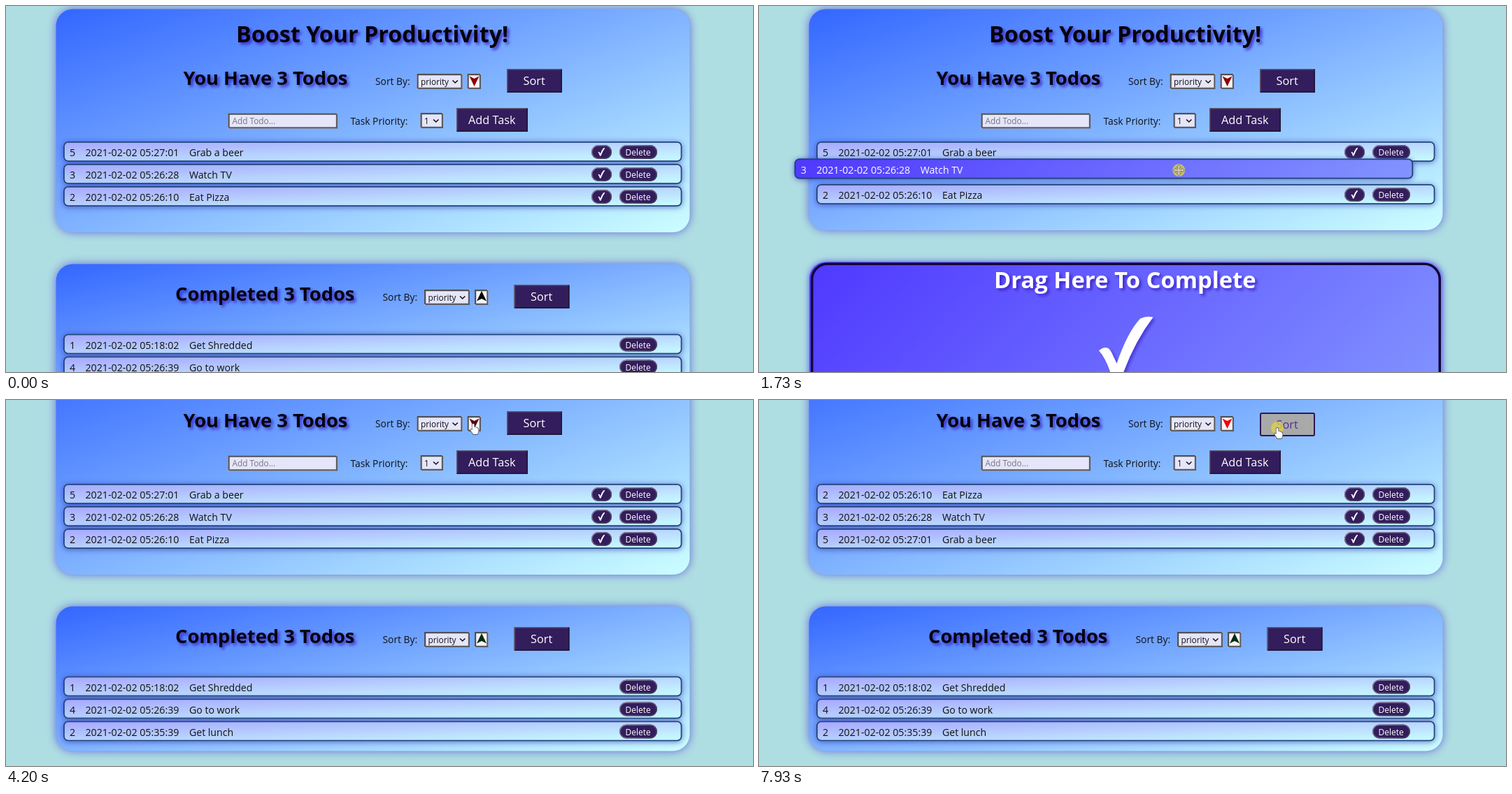
Write an HTML page with a canvas that moves like this. It is 1068 px wide and 524 px high and loops after 7.99 s.

```html
<!DOCTYPE html>
<html lang="en">
<head>
<meta charset="utf-8">
<title>Todo list</title>
<style>
html, body { margin: 0; height: 100%; overflow: hidden; background: #aedde2; }
canvas { display: block; }
</style>
</head>
<body>
<canvas id="stage" width="1068" height="524"></canvas>
<script>
const ctx = document.getElementById('stage').getContext('2d');
const LOOP = 7990;
const PURPLE = '#331d5c';
const ROW_TOP = 194, ROW_PITCH = 32;
const GRAB = { x: 631, y: 242 };
const DRAG = [820, 1880];

const beer = ['5', '2021-02-02 05:27:01', 'Grab a beer'];
const tv = ['3', '2021-02-02 05:26:28', 'Watch TV'];
const pizza = ['2', '2021-02-02 05:26:10', 'Eat Pizza'];
const completed = [
  ['1', '2021-02-02 05:18:02', 'Get Shredded'],
  ['4', '2021-02-02 05:26:39', 'Go to work'],
  ['2', '2021-02-02 05:35:39', 'Get lunch']
];

// time, x, y of the pointer
const pointerPath = [
  [180, 690, 545], [560, 640, 250], [800, 631, 242], [940, 633, 226],
  [1230, 659, 200], [1380, 706, 92], [1500, 640, 48], [1620, 549, 150],
  [1730, 600, 235], [1880, 631, 242], [2000, 640, 240], [2400, 741, 271],
  [2910, 741, 271], [3200, 600, 265], [3330, 545, 190], [3390, 568, 160],
  [3640, 610, 142], [3710, 610, 142], [4080, 668, 34], [4760, 668, 34],
  [5250, 745, 40], [6180, 745, 40], [6480, 693, 59], [6850, 668, 35],
  [7050, 668, 35], [7500, 741, 40]
];
// start, end, task under the pointer
const hovers = [
  [520, 820, tv], [1880, 2200, tv], [2200, 2700, pizza],
  [3380, 3440, pizza], [3440, 3600, tv], [3600, 3800, beer]
];
const presses = [[800, 1880], [4570, 4700], [5380, 5500], [6900, 7000], [7850, LOOP]];

const within = (t, [start, end]) => t >= start && t < end;

function pointerAt(t) {
  const next = pointerPath.findIndex(key => key[0] > t);
  if (next === 0) return { x: 690, y: 560 };
  if (next < 0) { const [, x, y] = pointerPath.at(-1); return { x, y }; }
  const [t0, x0, y0] = pointerPath[next - 1], [t1, x1, y1] = pointerPath[next];
  const p = (t - t0) / (t1 - t0);
  return { x: x0 + (x1 - x0) * p, y: y0 + (y1 - y0) * p };
}

function gradient(x, y, w, h, dx, dy, from, to) {
  const cx = x + w / 2, cy = y + h / 2;
  const g = ctx.createLinearGradient(cx - dx, cy - dy, cx + dx, cy + dy);
  g.addColorStop(0, from);
  g.addColorStop(1, to);
  return g;
}

function cornerGradient(x, y, w, h, from, to) {
  const k = w * h / (w * w + h * h);
  return gradient(x, y, w, h, h * k, w * k, from, to);
}

function activeGradient(x, y, w, h) {
  const reach = (w + h) / 4;
  return gradient(x, y, w, h, reach, reach, '#4f38ff', '#8395ff');
}

function glow(color, blur, dx = 0, dy = 0) {
  ctx.shadowColor = color;
  ctx.shadowBlur = blur;
  ctx.shadowOffsetX = dx;
  ctx.shadowOffsetY = dy;
}
const noGlow = () => glow('transparent', 0);

function box(x, y, w, h, radius, fill) {
  ctx.beginPath();
  ctx.roundRect(x, y, w, h, radius);
  ctx.fillStyle = fill;
  ctx.fill();
}

function outline(x, y, w, h, radius, width, color) {
  ctx.beginPath();
  ctx.roundRect(x + width / 2, y + width / 2, w - width, h - width, radius);
  ctx.lineWidth = width;
  ctx.strokeStyle = color;
  ctx.stroke();
}

function text(str, x, y, size, color = '#101018', weight = 400) {
  ctx.font = `${weight} ${size}px "Open Sans", "Noto Sans", sans-serif`;
  ctx.fillStyle = color;
  ctx.fillText(str, x, y);
}

function heading(str, x, y, size, color = '#03030c') {
  glow('rgba(50,25,190,.85)', 4, 3, 3);
  text(str, x, y, size, color, 700);
  noGlow();
}

function panel(y, h) {
  glow('rgba(75,65,215,.75)', 13);
  box(71.5, y, 906, h, 24, cornerGradient(72, y, 905.5, h, '#3366ff', '#ccffff'));
  noGlow();
}

function checkMark(x, y, scale) {
  ctx.save();
  ctx.translate(x, y);
  ctx.scale(scale, scale);
  ctx.fillStyle = '#fff';
  ctx.fill(new Path2D('M0 48Q12 38 18 51L25 66Q40 22 58 3Q66 -1 76 1Q48 38 31 88Q25 92 19 88Q11 60 0 48Z'));
  ctx.restore();
}

function pill(x, y, w) {
  box(x, y, w, 20, 10, PURPLE);
  outline(x, y, w, 20, 9, 1.5, cornerGradient(x, y, w, 20, '#8f88a6', '#3a3050'));
}

function row([priority, date, title], x, y, { light = 0, active = false, buttons = '' } = {}) {
  glow('rgba(50,40,170,.65)', 9, 0, 1);
  box(x, y, 884.5, 29, 7, active ? activeGradient(x, y, 884, 29) : cornerGradient(x, y, 884, 29, '#a6a6ff', '#c9ffff'));
  noGlow();
  outline(x, y, 884.5, 29, 6, 1.8, '#1b467c');
  const level = Math.round(16 + 239 * light), color = `rgb(${level},${level},${level})`;
  text(priority, x + 9, y + 21, 14.2, color);
  text(date, x + 31.5, y + 21, 14.2, color);
  text(title, x + 180, y + 21, 14.1, color);
  if (buttons.includes('check')) {
    pill(x + 755, y + 5, 29);
    checkMark(x + 764.5, y + 9, .13);
  }
  if (buttons.includes('delete')) {
    pill(x + 795, y + 5, 54);
    text('Delete', x + 803.5, y + 20, 12, '#fff');
  }
}

function bevel(x, y, w, h, light, dark, width) {
  ctx.lineWidth = width;
  const i = width / 2;
  for (const [color, cx, cy] of [[light, x + i, y + i], [dark, x + w - i, y + h - i]]) {
    ctx.strokeStyle = color;
    ctx.beginPath();
    ctx.moveTo(x + i, y + h - i);
    ctx.lineTo(cx, cy);
    ctx.lineTo(x + w - i, y + i);
    ctx.stroke();
  }
}

function button(label, x, y, w, labelX, { hover, pressed, focus } = {}) {
  if (pressed) y += 2;
  box(x, y, w, 34, 1, hover ? '#a9a9a9' : PURPLE);
  if (focus) {
    outline(x, y, w, 34, 2, 2, hover ? '#2e1758' : '#10091f');
    if (!hover) outline(x - 1, y - 1, w + 2, 36, 3, 1, 'rgba(255,255,255,.55)');
  } else bevel(x, y, w, 34, '#5d556a', '#1d1430', 1.5);
  text(label, labelX, y + 23, 16.3, hover ? '#51308f' : '#fff');
}

function field(x, y, w, fill = '#e6e6fa') {
  box(x, y, w, 22, 1, fill);
  bevel(x, y, w, 22, '#505055', '#5c5c62', 2.2);
}

function select(label, x, y, w) {
  field(x, y, w);
  text(label, x + 5.5, y + 16, 11.8);
  ctx.strokeStyle = '#111';
  ctx.lineWidth = 1.6;
  ctx.beginPath();
  ctx.moveTo(x + w - 14, y + 9.5);
  ctx.lineTo(x + w - 10.3, y + 13);
  ctx.lineTo(x + w - 6.6, y + 9.5);
  ctx.stroke();
}

function sortControls(x, y, arrowUp, arrowColor, sortState) {
  text('Sort By:', x, y + 16, 13.8);
  select('priority', x + 59.5, y, 65);
  field(x + 131.5, y, 19.5, '#f6f4fa');
  const cx = x + 141.5, cy = y + 10, dir = arrowUp ? 1 : -1;
  ctx.fillStyle = arrowColor;
  ctx.beginPath();
  ctx.moveTo(cx, cy - 8 * dir);
  ctx.lineTo(cx + 7, cy + 6.5 * dir);
  ctx.lineTo(cx, cy + 3 * dir);
  ctx.lineTo(cx - 7, cy + 6.5 * dir);
  ctx.fill();
  button('Sort', x + 188, y - 7, 79, x + 211.5, sortState);
}

function dropZone(y) {
  glow('rgba(60,50,230,.8)', 10);
  box(72, y, 905, 207, 24, activeGradient(72, y, 905, 207));
  noGlow();
  outline(74, y + 1, 901, 203, 22, 3.5, '#140534');
  heading('Drag Here To Complete', 336, y + 37.5, 32.8, '#fff');
  glow('rgba(50,25,190,.6)', 4, 3, 3);
  checkMark(486, y + 78, 1.02);
  noGlow();
}

const cursors = {
  move: new Path2D('M0 -7.5L2.5 -4.5H1V-1H4.5V-2.5L7.5 0L4.5 2.5V1H1V4.5H2.5L0 7.5L-2.5 4.5H-1V1H-4.5V2.5L-7.5 0L-4.5 -2.5V-1H-1V-4.5H-2.5Z'),
  hand: new Path2D('M-1.5 1Q0 -1 1.5 1V5Q3 4 4 5.5Q5.5 5 6 6.5Q7.5 6 7.5 8V11L6 15H0L-4 9Q-4 7 -1.5 9Z'),
  arrow: new Path2D('M0 0V10.5L2.4 8.4L4 12L5.7 11.3L4.2 7.8H7.5Z')
};

function drawPointer({ x, y }, kind, pressed) {
  ctx.save();
  ctx.translate(x, y);
  if (pressed) {
    ctx.beginPath();
    ctx.arc(0, 0, 9, 0, 7);
    ctx.fillStyle = 'rgba(222,207,75,.8)';
    ctx.fill();
  }
  if (kind === 'move' && pressed) ctx.globalAlpha = .5;
  ctx.lineWidth = 1.3;
  ctx.strokeStyle = '#383840';
  ctx.stroke(cursors[kind]);
  ctx.fillStyle = '#fff';
  ctx.fill(cursors[kind]);
  ctx.restore();
}

function draw(t) {
  const pointer = pointerAt(t);
  const scroll = t < 2670 ? 0 : t < 2730 ? 37 : 74;
  const dragging = within(t, DRAG);
  const pressed = presses.some(span => within(t, span));
  const hover = hovers.find(span => within(t, span));
  const ascending = within(t, [4640, 6940]);
  const clicked = t >= 4640;
  const overSort = t > 4570 && pointer.x > 716 && pointer.y < 50;
  const shift = dragging ? -3 : 0;

  ctx.fillStyle = '#aedde2';
  ctx.fillRect(0, 0, 1068, 524);
  ctx.save();
  ctx.translate(0, -scroll);

  panel(4.5, 319.5 + shift);
  heading('Boost Your Productivity!', 329, 52, 32.3);
  heading('You Have 3 Todos', 253.5, 113, 27.3);
  const arrowColor = clicked ? (ascending ? '#0bcf12' : '#f3000b') : t < 2670 ? '#8b0000' : '#5c0508';
  sortControls(528, 97, ascending, arrowColor, {
    hover: overSort,
    pressed: overSort && pressed,
    focus: within(t, [5380, 6900]) || t >= 7850
  });
  field(317.5, 153.5, 156.5);
  text('Add Todo...', 323.5, 169, 11.8, '#77757f');
  text('Task Priority:', 492.5, 170, 13.8);
  select('1', 592.5, 153, 32.5);
  button('Add Task', 644, 146, 102, 661);

  if (dragging) dropZone(366.5);
  else {
    panel(369.5, 207);
    heading('Completed 3 Todos', 242, 422, 27.3);
    sortControls(538.5, 406, true, t < 2670 ? '#000' : '#042c0c');
    completed.forEach((task, i) => row(task, 82, 469.5 + i * ROW_PITCH, { buttons: 'delete' }));
  }

  const tasks = t < 5480 ? [beer, tv, pizza] : [pizza, tv, beer];
  const gapOnTop = pointer.y < GRAB.y - 25;
  tasks.forEach((task, i) => {
    if (dragging && task === tv) return;
    let y = ROW_TOP + i * ROW_PITCH;
    if (dragging) y = task === pizza ? 255 : gapOnTop ? 223 : ROW_TOP;
    const active = !!hover && hover[2] === task;
    const light = active ? Math.min(1, (t - hover[0]) / 200) : 0;
    row(task, 82, y, { active, light, buttons: 'check delete' });
  });
  if (dragging) {
    row(tv, 81.5 + pointer.x - GRAB.x, 225.5 + pointer.y - GRAB.y, { active: true, light: 1 });
  }
  ctx.restore();

  const pageY = pointer.y + scroll;
  const overRows = pageY > ROW_TOP && pageY < 287;
  const overArrow = t > 3900 && Math.abs(pointer.x - 669.5) < 10 && pointer.y < 46;
  const kind = dragging || overRows ? 'move' : overSort || overArrow ? 'hand' : 'arrow';
  drawPointer(pointer, kind, pressed);
}

const start = performance.now();
function tick() {
  draw((performance.now() - start) % LOOP);
  requestAnimationFrame(tick);
}
tick();
</script>
</body>
</html>
```
